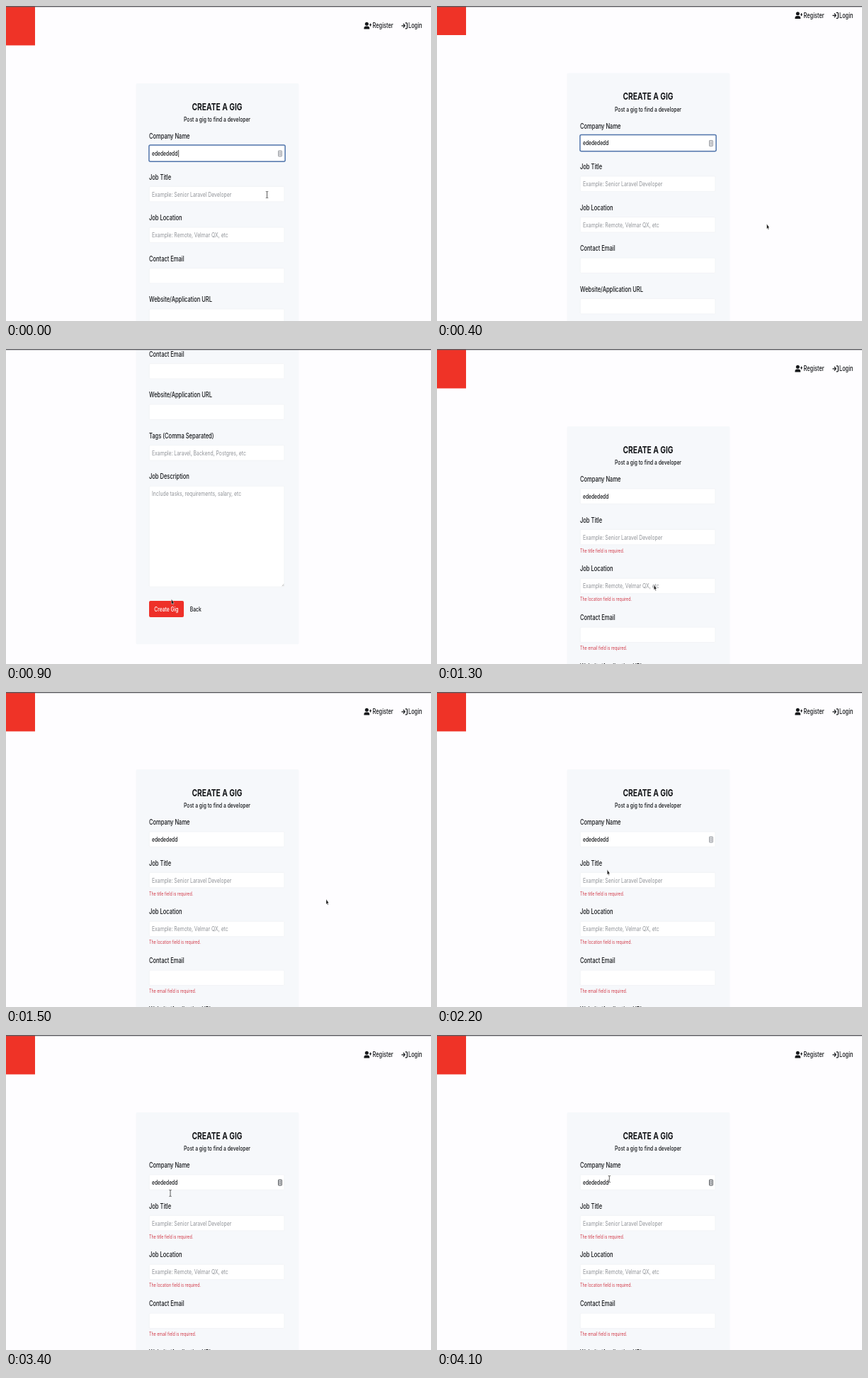
Animation of 600x444 px, one loop 4200 ms. Source, as an HTML page:

```html
<!DOCTYPE html>
<html lang="en">
<head>
<meta charset="utf-8">
<title>Create a gig</title>
<style>
  html, body { margin: 0; width: 100%; height: 100%; overflow: hidden; background: #fefdff; }
  svg { display: block; width: 600px; height: 444px; font-family: Inter, "Open Sans", sans-serif; }
</style>
</head>
<body>
<svg id="stage" viewBox="0 0 600 444">
  <rect width="600" height="444" fill="#fefdff"/>
  <g id="page">
    <rect y="0" width="41" height="55.5" fill="#ef3327"/>
    <g id="nav" fill="#15171a">
      <circle cx="509.3" cy="25.2" r="2.5"/>
      <path d="M505.4 32.6v-1.2q0-3 2.8-3h2.2q2.8 0 2.8 3v1.2z"/>
      <path d="M514.5 24.6v4M513 26.6h3" fill="none" stroke="#15171a" stroke-width="1"/>
      <path d="M558.4 27.8h4.6M560.9 24.9l2.3 2.9l-2.3 2.9M563.7 23.8h1.7q1 0 1 1.2v5.6q0 1.2 -1 1.2h-1.7" fill="none" stroke="#15171a" stroke-width="1.2"/>
    </g>
    <g id="blank"></g>
    <g id="checked"></g>
    <g id="focus">
      <rect x="201.9" y="195.9" width="192.2" height="23.4" rx="2" fill="none" stroke="#5377ad" stroke-width="1.5"/>
      <path id="caret" d="M243.6 203v10" stroke="#222" stroke-width=".8"/>
    </g>
    <g id="fill">
      <rect x="384.5" y="204" width="4.8" height="8" rx=".5" fill="#e4e5e8" stroke="currentColor" stroke-width="1"/>
      <path d="M385.6 206.2h2.6M385.6 208h2.6M385.6 209.8h2.6" stroke="currentColor" stroke-width=".8"/>
    </g>
  </g>
  <rect width="600" height="1.4" fill="#5b5b60"/>
  <path id="arrow" d="M0 0V7.2L1.3 6L2.2 8.3L3.1 7.8L2.2 5.6H3.8Z" fill="#111" stroke="#fff" stroke-width=".4"/>
  <path id="beam" d="M-1.6 -4.6Q0 -4.6 0 -3.6Q0 -4.6 1.6 -4.6M0 -3.6V3.6M-1.6 4.6Q0 4.6 0 3.6Q0 4.6 1.6 4.6" fill="none" stroke="#333" stroke-width=".8"/>
</svg>
<script>
const LOOP = 4200, STEP = 100;
const SQUEEZE = 0.76; // the widescreen page is shown at a narrower aspect
const INK = '#15171a', GRAY = '#92959a', RED = '#ee3029', ERROR = '#d23c4a';
const $ = id => document.getElementById(id);

function add(parent, tag, attrs) {
  const el = document.createElementNS('http://www.w3.org/2000/svg', tag);
  for (const k in attrs) el.setAttribute(k, attrs[k]);
  parent.appendChild(el);
  return el;
}

// y is the middle of the capitals
function label(parent, str, x, y, size, extra = {}) {
  add(parent, 'text', {
    transform: `translate(${x} ${y + size * 0.36}) scale(${SQUEEZE} 1)`,
    'font-size': size, 'font-weight': 500, fill: INK, ...extra
  }).textContent = str;
}

function hint(parent, str, y) {
  label(parent, str, 206, y, 9, { fill: GRAY, 'font-weight': 400 });
}

function box(parent, y, h) {
  add(parent, 'rect', { x: 202.3, y, width: 190.6, height: h, rx: 1.5,
    fill: '#fff', stroke: '#eff1f4', 'stroke-width': 0.7 });
}

const fields = [
  { name: 'Company Name', value: 'ededededd' },
  { name: 'Job Title', hint: 'Example: Senior Laravel Developer', key: 'title' },
  { name: 'Job Location', hint: 'Example: Remote, Velmar QX, etc', key: 'location' },
  { name: 'Contact Email', key: 'email' },
  { name: 'Website/Application URL', key: 'website' },
  { name: 'Tags (Comma Separated)', hint: 'Example: Laravel, Backend, Postgres, etc', key: 'tags' }
];

function buildForm(g, errors) {
  const card = add(g, 'rect', { x: 183.5, y: 109, width: 230, rx: 2, fill: '#f6f8fb' });
  const mid = { 'text-anchor': 'middle' };
  label(g, 'CREATE A GIG', 298, 141.8, 13.5, { ...mid, 'font-weight': 700 });
  label(g, 'Post a gig to find a developer', 298, 159.8, 8.9, mid);
  let y = 183.5;
  const fail = (key, at) => {
    label(g, `The ${key} field is required.`, 202, at, 7, { fill: ERROR, 'font-weight': 400 });
    y += 11.3;
  };
  for (const f of fields) {
    label(g, f.name, 202, y, 9.9);
    box(g, y + 13.4, 21.4);
    if (f.value) label(g, f.value, 206, y + 24.3, 8.8);
    if (f.hint) hint(g, f.hint, y + 24.3);
    if (errors && f.key) fail(f.key, y + 43);
    y += 57.55;
  }
  label(g, 'Job Description', 202, y, 9.9);
  box(g, y + 13.4, 142);
  hint(g, 'Include tasks, requirements, salary, etc', y + 24.3);
  add(g, 'path', { d: `M389.8 ${y + 154.5}l2.4 -3M391.4 ${y + 154.5}l.9 -1.2`, stroke: '#999', 'stroke-width': 0.6 });
  if (errors) fail('description', y + 164);
  add(g, 'rect', { x: 202, y: y + 175.3, width: 49, height: 22.8, rx: 2, fill: RED });
  label(g, 'Create Gig', 226.4, y + 187, 8.9, { ...mid, fill: '#fff' });
  label(g, 'Back', 259.8, y + 187, 8.9);
  card.setAttribute('height', y + 236.5 - 109);
}

label($('nav'), 'Register', 517.6, 28, 9.7);
label($('nav'), 'Login', 568, 28, 9.7);
buildForm($('blank'), false);
buildForm($('checked'), true);

// rows of [time, value, ...]
const scroll = [[0, 0], [300, 0], [400, 14.5], [500, 190], [600, 349], [1200, 349], [1300, 0]];
const pointer = [
  [0, 368.5, 266], [300, 465.5, 307], [600, 465.5, 307], [900, 233.5, 352.5], [1200, 233.5, 352.5],
  [1500, 452, 292], [1900, 452, 292], [2200, 240.3, 250.3], [2500, 240.3, 250.3],
  [3400, 232, 223], [3700, 232, 223], [4100, 243.3, 203]
];

function at(track, t) {
  const i = track.findIndex(k => k[0] > t);
  if (i < 0) return track[track.length - 1].slice(1);
  const a = track[i - 1], b = track[i];
  const p = (t - a[0]) / (b[0] - a[0]);
  return a.slice(1).map((v, n) => v + (b[n + 1] - v) * p);
}

const show = (id, on) => $(id).setAttribute('visibility', on ? 'visible' : 'hidden');

function draw(ms) {
  const t = Math.floor((ms % LOOP) / STEP) * STEP;
  const sent = t >= 1300;
  $('page').setAttribute('transform', `translate(0 ${-at(scroll, t)[0]})`);
  show('blank', !sent);
  show('checked', sent);
  show('focus', !sent);
  show('caret', t < 300);
  show('fill', !sent || t >= 1900);
  $('fill').setAttribute('color', t >= 2500 ? '#55585c' : '#9a9da2');

  const [x, y] = at(pointer, t);
  const typing = t < 100 || t >= 3100;
  show('arrow', !typing);
  show('beam', typing);
  $(typing ? 'beam' : 'arrow').setAttribute('transform', `translate(${x} ${y})`);
}

const start = performance.now();
function tick() {
  draw(performance.now() - start);
  requestAnimationFrame(tick);
}
tick();
</script>
</body>
</html>
```
